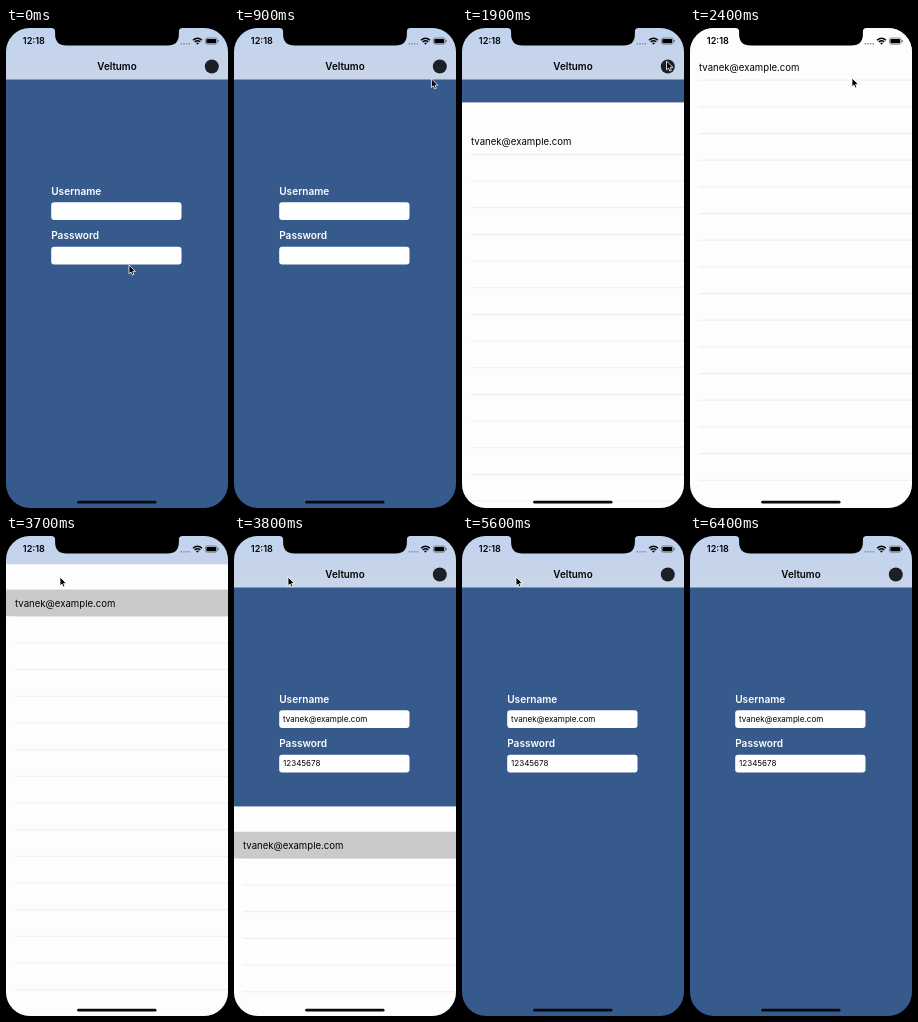
These frames come from a looping animation (222 by 480 pixels, 6.9 s). An HTML page:

```html
<!DOCTYPE html>
<html lang="en">
<head>
<meta charset="utf-8">
<style>
html, body { margin: 0; width: 100%; height: 100%; overflow: hidden; background: #000; }
svg { display: block; width: 222px; height: 480px; font-family: Inter, Roboto, sans-serif; }
.bold { font-weight: 600; }
</style>
</head>
<body>
<svg viewBox="0 0 222 480">
  <defs>
    <clipPath id="screen"><rect width="222" height="480" rx="24"/></clipPath>
    <linearGradient id="bar" x2="0" y2="1">
      <stop stop-color="#c2d3ee"/><stop offset="1" stop-color="#c8d5e9"/>
    </linearGradient>
  </defs>
  <rect width="222" height="480"/>
  <g clip-path="url(#screen)">
    <rect width="222" height="480" fill="#375a8c"/>
    <rect width="222" height="51.5" fill="url(#bar)"/>
    <text class="bold" x="111" y="42" font-size="9.8" text-anchor="middle">Veltumo</text>
    <circle cx="205.8" cy="38.5" r="7" fill="#1c2026"/>

    <g class="bold" fill="#fff" font-size="10.1">
      <text x="45.2" y="167">Username</text>
      <text x="45.2" y="211.4">Password</text>
    </g>
    <g fill="#fff">
      <rect x="45.2" y="174.3" width="130.3" height="17.7" rx="3"/>
      <rect x="45.2" y="218.7" width="130.3" height="17.7" rx="3"/>
    </g>
    <g id="filled" font-size="8.05">
      <text x="49" y="186">tvanek@example.com</text>
      <text x="49" y="230.3">12345678</text>
    </g>

    <g id="sheet">
      <rect width="222" height="490" fill="#fdfdfd"/>
      <g id="lines" stroke="#e6e6e8" stroke-width=".7"></g>
      <rect id="picked" y="25.3" width="222" height="26.7" fill="#cacaca"/>
      <text x="9" y="42.4" font-size="9.6">tvanek@example.com</text>
    </g>

    <path d="M45.5 0Q49.1 0 49.1 3.6V6Q49.1 17.5 60.6 17.5H161.4Q172.9 17.5 172.9 6V3.6Q172.9 0 176.5 0Z"/>
    <text class="bold" x="16.8" y="16.4" font-size="9.1">12:18</text>
    <path d="M174.5 15.8H184" stroke="#8290a6" stroke-width="1.4" stroke-dasharray="1.5 1.2"/>
    <g fill="none" stroke="#000" stroke-width="1.5">
      <path d="M187 12.2Q191.5 8.2 196 12.2M188.7 14Q191.5 11.6 194.3 14"/>
    </g>
    <path d="M190 15.1Q191.5 13.9 193 15.1L191.5 16.7Z"/>
    <rect x="199.4" y="10" width="11.8" height="6.2" rx="1.9" fill="none" stroke="#555d69" stroke-width=".7"/>
    <rect x="200.4" y="11" width="9.8" height="4.2" rx="1"/>
    <rect x="211.9" y="12" width=".8" height="2.2" rx=".4" fill="#555d69"/>
    <rect x="71.2" y="472.7" width="79.3" height="2.9" rx="1.45" fill="#08090b"/>
  </g>
  <path id="cursor" d="M0 0V8.8L2 7 3.3 10 4.9 9.3 3.6 6.4H6.4Z" stroke="#fff" stroke-width=".8" stroke-linejoin="round"/>
</svg>
<script>
const LOOP = 6900, STEP = 100, HEIGHT = 480;
const OPEN = 1678, PICK = 3500, CLOSE = 3674;
const $ = id => document.getElementById(id);
const show = (id, on) => $(id).setAttribute('display', on ? 'inline' : 'none');
const move = (id, x, y) => $(id).setAttribute('transform', `translate(${x} ${y})`);

$('lines').innerHTML = Array.from({ length: 16 }, (_, i) =>
  `<path d="M9 ${(52 + i * 26.67).toFixed(1)}H222"/>`).join('');

// Pointer stops: time, x, y
const stops = [
  [0, 123, 237], [1100, 204.5, 33], [2100, 204.5, 33], [2400, 162, 50],
  [2800, 65, 50], [3100, 54, 41], [5900, 54, 41], [6400, 130, -14]
];

function pointer(t) {
  const i = stops.findIndex(s => s[0] > t);
  if (i < 0) return stops.at(-1).slice(1);
  const [t0, x0, y0] = stops[i - 1], [t1, x1, y1] = stops[i];
  let p = (t - t0) / (t1 - t0);
  if (i === 1) p = p * p * (3 - 2 * p);
  return [x0 + (x1 - x0) * p, y0 + (y1 - y0) * p];
}

// Remaining part of a critically damped spring
function spring(t) {
  const x = Math.max(0, t) * 0.015;
  return (1 + x) * Math.exp(-x);
}

function draw(now) {
  const t = Math.floor(now % LOOP / STEP) * STEP;
  const top = t < PICK ? spring(t - OPEN) : 1 - spring(t - CLOSE);
  show('sheet', t > OPEN && t < 4300);
  move('sheet', 0, HEIGHT * top);
  show('picked', t >= PICK);
  show('filled', t >= PICK);
  move('cursor', ...pointer(t));
}

let start;
function frame(now) {
  start ??= now;
  draw(now - start);
  requestAnimationFrame(frame);
}
draw(0);
requestAnimationFrame(frame);
</script>
</body>
</html>
```
